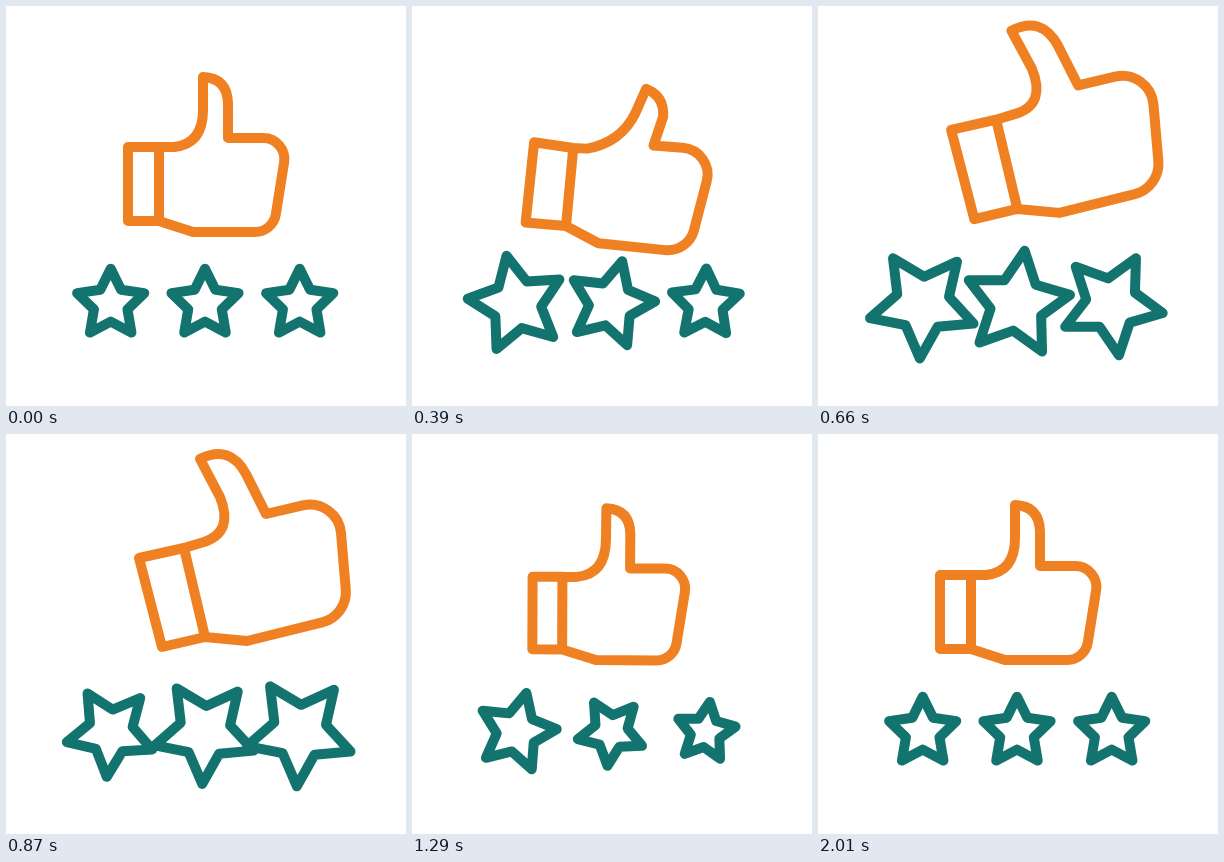
Animation, 400 px wide and 400 px high, one loop 2540 ms. Source, as an HTML page with a canvas:

```html
<!DOCTYPE html>
<html lang="en">
<head>
<meta charset="utf-8">
<title>Thumbs up with stars</title>
<style>
html, body { margin: 0; height: 100%; overflow: hidden; background: #fff; }
canvas { display: block; width: 400px; height: 400px; }
</style>
</head>
<body>
<canvas id="stage" width="400" height="400"></canvas>
<script>
const ctx = document.getElementById('stage').getContext('2d');
const LOOP = 2540, STEP = 30, RAD = Math.PI / 180;
const PIVOT = [140, 178];

// Smooth interpolation through keys [time, ...values], flat at extremes.
function sample(keys, t) {
  const last = keys.length - 1;
  if (t <= keys[0][0]) return keys[0].slice(1);
  if (t >= keys[last][0]) return keys[last].slice(1);
  const i = keys.findIndex(k => k[0] > t) - 1;
  const slope = (j, c) => {
    if (j === 0 || j === last) return 0;
    const [a, b, d] = [keys[j - 1], keys[j], keys[j + 1]];
    const s1 = (b[c] - a[c]) / (b[0] - a[0]), s2 = (d[c] - b[c]) / (d[0] - b[0]);
    return s1 * s2 <= 0 ? 0 : 2 * s1 * s2 / (s1 + s2);
  };
  const a = keys[i], b = keys[i + 1], h = b[0] - a[0], u = (t - a[0]) / h;
  const u2 = u * u, u3 = u2 * u;
  return a.slice(1).map((v, n) =>
    v * (2 * u3 - 3 * u2 + 1) + b[n + 1] * (3 * u2 - 2 * u3) +
    h * (slope(i, n + 1) * (u3 - 2 * u2 + u) + slope(i + 1, n + 1) * (u3 - u2)));
}

function rotate(points, degrees) {
  const c = Math.cos(degrees * RAD), s = Math.sin(degrees * RAD), out = [];
  for (let i = 0; i < points.length; i += 2) {
    const x = points[i] - PIVOT[0], y = points[i + 1] - PIVOT[1];
    out.push(PIVOT[0] + x * c - y * s, PIVOT[1] + x * s + y * c);
  }
  return out;
}

// A pose is its tilt followed by the untilted points:
// cuff TL, TR, BR, BL; wrist, bend, thumb base; tip, bend, thumb side; crotch; knuckle, heel, palm.
const pose = (tilt, ...points) => [tilt, ...rotate(points, -tilt)];
const mix = (a, b, k) => a.map((v, i) => v + (b[i] - v) * k);

const rest = pose(0, 122,141, 153,141, 153,215, 122,215, 168,141, 197,138, 197,104,
  197,71, 221,72, 222,97, 222,132, 282,132, 267,226, 187,226);
const down = pose(29, 123,133, 155,152, 123,213, 90,197, 165,156, 200,157, 228,148,
  255,141, 257,158, 247,166, 223,178, 272,200, 214,276, 143,239);
const rise = pose(-11, 124,132, 166,125, 184,211, 141,220, 183,121, 216,112, 208,72,
  198,41, 224,33, 236,60, 248,96, 316,82, 322,198, 224,217);
const high = pose(-13, 133,124, 178,114, 199,203, 156,213, 198,108, 228,98, 214,63,
  194,25, 224,10, 240,40, 260,80, 332,63, 342,182, 241,207);
const fall = pose(-1, 131,129, 170,129, 172,212, 133,213, 188,128, 220,123, 217,90,
  214,49, 242,48, 246,78, 248,115, 317,114, 302,222, 208,225);

const handKeys = [
  [0, ...rest], [240, ...down], [510, ...rise], [720, ...mix(rise, high, 1.17)],
  [870, ...high], [1110, ...fall], [1290, ...mix(rest, fall, -.15)],
  [1570, ...mix(rest, fall, .1)], [1900, ...rest]
];

// [time, radius, rotation]
const starKeys = [
  [0, 35.3, 0], [130, 32, -5], [240, 40.3, 9], [310, 45.5, 18], [410, 50, 72],
  [510, 53, 126], [650, 54.5, 183], [770, 52, 183], [870, 45, 185], [910, 39, 184],
  [1010, 30, 126], [1110, 30.5, 71], [1330, 41, 7], [1430, 39, -2],
  [1530, 36.5, -7], [1800, 35.3, 0]
];

function drawStar(x, y, radius, rotation) {
  ctx.beginPath();
  for (let i = 0; i < 10; i++) {
    const a = (rotation + i * 36) * RAD, r = i % 2 ? radius / 2 : radius;
    ctx.lineTo(x + r * Math.sin(a), y - r * Math.cos(a));
  }
  ctx.closePath();
  ctx.stroke();
}

function drawHand(t) {
  const [tilt, ...local] = sample(handKeys, t);
  const p = rotate(local, tilt);
  const at = (i, n = 1) => p.slice(i * 2, (i + n) * 2);
  const round = .68 * Math.hypot(p[2] - p[0], p[3] - p[1]);
  ctx.beginPath();
  ctx.moveTo(...at(0));
  ctx.lineTo(...at(1));
  ctx.lineTo(...at(4));
  ctx.quadraticCurveTo(...at(5, 2));
  ctx.lineTo(...at(7));
  ctx.quadraticCurveTo(...at(8, 2));
  ctx.lineTo(...at(10));
  ctx.arcTo(...at(11, 2), round);
  ctx.arcTo(...at(12, 2), round);
  ctx.lineTo(...at(13));
  ctx.lineTo(...at(2));
  ctx.lineTo(...at(3));
  ctx.closePath();
  ctx.moveTo(...at(1));
  ctx.lineTo(...at(2));
  ctx.stroke();
}

function frame(now) {
  const t = Math.floor(now % LOOP / STEP) * STEP;
  ctx.fillStyle = '#fff';
  ctx.fillRect(0, 0, 400, 400);
  ctx.lineWidth = 10;
  ctx.lineJoin = ctx.lineCap = 'round';
  ctx.strokeStyle = '#13736f';
  [104.7, 199, 293.7].forEach((x, i) => drawStar(x, 298, ...sample(starKeys, t - 100 * i)));
  ctx.strokeStyle = '#ef8122';
  drawHand(t);
  requestAnimationFrame(frame);
}
frame(0);
</script>
</body>
</html>
```
